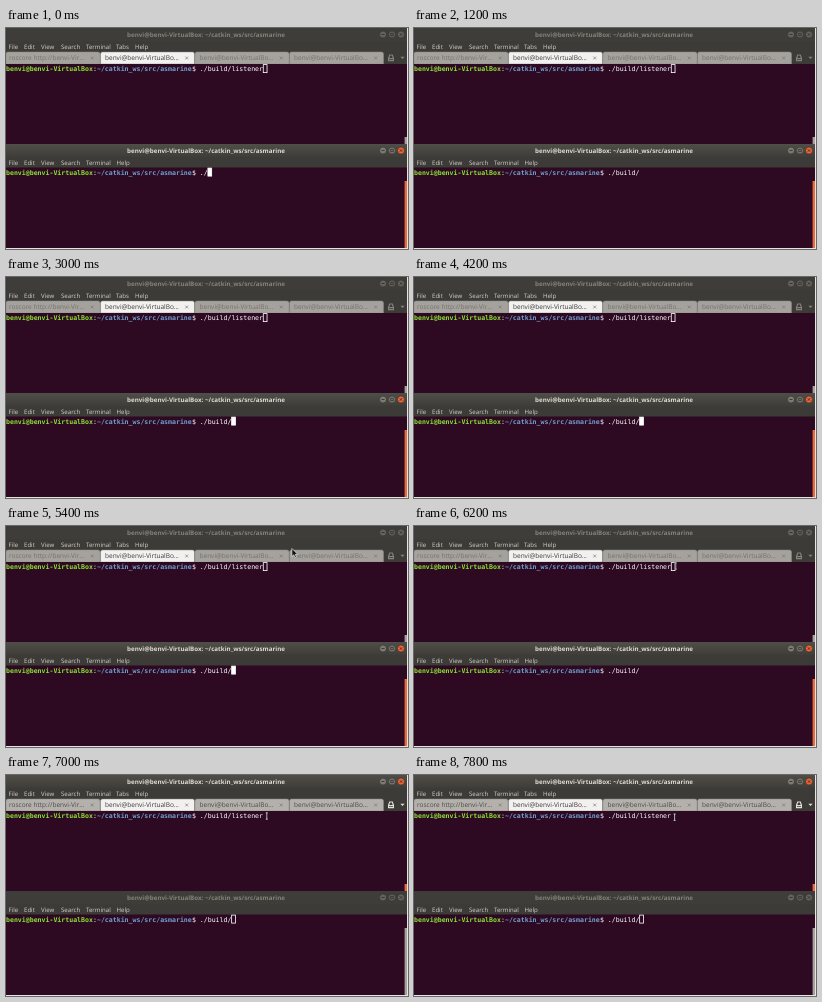
An HTML page that plays this animation: 402 px wide and 221 px high, repeating every 8 s.

```html
<!DOCTYPE html>
<html lang="en">
<head>
<meta charset="utf-8">
<title>Two terminals</title>
<style>
html, body { margin: 0; width: 100%; height: 100%; overflow: hidden; background: #e6e3e0; }
svg { display: block; width: 402px; height: 221px; }
text { font-family: "Open Sans", "Noto Sans", sans-serif; font-size: 6.1px; text-rendering: geometricPrecision; white-space: pre; }
.mono text { font-family: "DejaVu Sans Mono", monospace; font-size: 6.57px; fill: #fff; }
.mono .user { fill: #8ae234; font-weight: 700; }
.mono .path { fill: #729fcf; font-weight: 700; }
.bar { fill: #3e3d39; }
.active .bar { fill: url(#bar); }
.title { font-size: 6.22px; font-weight: 700; fill: #85827a; text-anchor: middle; }
.active .title { fill: #dfdbd2; }
.menu { fill: #d5d1c8; }
.tab { fill: #a5a29d; stroke: #8b8883; stroke-width: .5; }
.active .tab { fill: #b4b1ac; }
.tab.front, .active .tab.front { fill: #f3f1ef; }
.label { font-size: 6.5px; fill: #74716d; }
.active .label { fill: #4e4c49; }
.label.front, .active .label.front { fill: #3c3b39; }
.cross { stroke: #77746f; stroke-width: .7; }
.icon { fill: #85827a; }
.active .icon { fill: #e6e2da; }
.button { fill: #64625c; stroke: #33322e; stroke-width: .6; }
.active .button { fill: #7d7a72; }
.active .button.close { fill: #ee6437; }
.glyph { fill: none; stroke: #2e2d29; stroke-width: .8; }
.thumb { fill: #a5a19c; }
.active .thumb { fill: #ea6a3c; }
.caret { fill: none; stroke: #fff; stroke-width: .8; }
.active .caret { fill: #fff; }
</style>
</head>
<body>
<svg id="stage" viewBox="0 0 402 221" xmlns="http://www.w3.org/2000/svg">
  <defs>
    <linearGradient id="bar" x2="0" y2="1">
      <stop offset="0" stop-color="#504e48"/>
      <stop offset="1" stop-color="#3e3d39"/>
    </linearGradient>
  </defs>
</svg>
<script>
const COL = 3.955, LOOP = 8000, BLINK = 600, SWAP = 6400;
const USER = "benvi", HOST = USER + "@" + USER + "-VirtualBox", DIR = "~/catkin_ws/src/asmarine";
const PROMPT = HOST.length + DIR.length + 3;
const stage = document.getElementById("stage");

function add(parent, tag, attrs, text) {
  const el = document.createElementNS("http://www.w3.org/2000/svg", tag);
  for (const key in attrs) el.setAttribute(key, attrs[key]);
  if (text) el.textContent = text;
  parent.appendChild(el);
  return el;
}
const rect = (g, x, y, width, height, more) => add(g, "rect", { x, y, width, height, ...more });
const path = (g, d, more) => add(g, "path", { d, ...more });
const label = (g, x, y, text, cls) => add(g, "text", { x, y, class: cls }, text);

function addButtons(g, y) {
  const marks = ["M-1.5 0h3", "M-1.3 -1.2h2.6v2.4h-2.6z", "M-1.2 -1.2l2.4 2.4M1.2 -1.2l-2.4 2.4"];
  marks.forEach((d, i) => {
    const b = add(g, "g", { transform: `translate(${377 + i * 9} ${y})` });
    add(b, "circle", { r: 3.5, class: i === 2 ? "button close" : "button" });
    path(b, d, { class: "glyph" });
  });
}

function addTabs(g) {
  rect(g, 0, 24, 401, 12, { fill: "#3c3b37" });
  const shell = HOST.slice(0, -1) + "…";
  const names = [`roscore http://${USER}-Vir…`, shell, shell, shell];
  names.forEach((name, i) => {
    const x = i * 94.5, front = i === 1 ? " front" : "";
    path(g, `M${x} 36V26q0 -2 2 -2h90q2 0 2 2V36z`, { class: "tab" + front });
    label(g, x + (i ? 4.5 : 3), 32.4, name, "label" + front);
    path(g, `M${x + 84.8} 28.6l2.8 2.8m0 -2.8l-2.8 2.8`, { class: "cross" });
  });
  path(g, "M382 33.2v-3.2l1.3 -3.4h3.4l1.3 3.4v3.2zM383.3 30h3.4l-.8 -2.4h-1.8zM383 31.3v.8h4v-.8z",
    { class: "icon", "fill-rule": "evenodd" });
  path(g, "M394.4 28.7h4.2l-2.1 2.3z", { class: "icon" });
}

function addWindow(top, head, bottom, menus, tabbed) {
  const g = add(stage, "g", {});
  rect(g, 0, top, 401, 13, { class: "bar" });
  rect(g, 0, top + 13, 401, 11, { fill: "#3c3b37" });
  label(g, 200, top + 8.8, `${HOST}: ${DIR}`, "title");
  addButtons(g, top + 6.5);
  for (const [x, name] of menus) label(g, x, top + 20.7, name, "menu");
  if (tabbed) addTabs(g);
  rect(g, 0, head, 401, bottom - head, { fill: "#2d0922" });
  const thumbTop = tabbed ? 109 : 153;
  rect(g, 398.6, thumbTop, 2.4, bottom - thumbTop, { class: "thumb" });

  const mono = add(g, "g", { class: "mono" });
  const at = (col, text, cls) => label(mono, col * COL, head + 7.1, text, cls);
  at(0, HOST, "user");
  at(HOST.length, ":");
  at(HOST.length + 1, DIR, "path");
  at(PROMPT - 2, "$");
  const typed = at(PROMPT, "");
  const caret = rect(mono, 0, head + .6, COL - .2, 8, { class: "caret" });
  return {
    show(text, active, lit) {
      g.setAttribute("class", active ? "active" : "");
      typed.textContent = text;
      caret.setAttribute("x", (PROMPT + text.length) * COL + .2);
      caret.setAttribute("visibility", lit || !active ? "visible" : "hidden");
    }
  };
}

const menu = [[2.5, "File"], [18, "Edit"], [35, "View"], [55, "Search"], [80, "Terminal"]];
const upper = addWindow(0, 36, 116, [...menu, [110, "Tabs"], [129, "Help"]], true);
const lower = addWindow(116, 139.5, 220, [...menu, [110.5, "Help"]], false);

const arrow = path(stage, "M0 0V8L1.9 6.3L3.2 9.2L4.5 8.6L3.3 5.8H5.8Z",
  { fill: "#111", stroke: "#fff", "stroke-width": .6 });
const beam = add(stage, "g", {});
for (const [stroke, width] of [["#111", 1.4], ["#fff", .7]])
  path(beam, "M-1 .8H1M0 .8V7.2M-1 7.2H1", { fill: "none", stroke, "stroke-width": width });

// [start, value...] rows: the last row already reached applies
const typing = [[0, "./"], [400, "./b"], [600, "./build/"]];
const pointer = [
  [0, null], [5000, arrow, 166, 146.5], [5200, arrow, 177, 85.5], [5400, arrow, 285.9, 22.5],
  [5600, arrow, 280.3, 31], [5800, arrow, 268.5, 33.5], [6000, beam, 262.2, 35.8],
  [6200, beam, 261.8, 36], [6400, beam, 261, 36.2], [6600, beam, 260.8, 36],
  [7000, beam, 260.8, 37], [7200, beam, 261.2, 44.6], [7800, beam, 260.6, 38.2]
];
const reached = (rows, t) => rows.filter(r => r[0] <= t).pop();

// the blink restarts on typing and when the focus moves
function isLit(t) {
  if (t >= SWAP) return t < SWAP + BLINK;
  if (t < BLINK) return t < 200 || t >= 400;
  return Math.floor(t / BLINK) % 2 === 1;
}

function draw(t) {
  const swapped = t >= SWAP, lit = isLit(t);
  upper.show("./build/listener", swapped, lit);
  lower.show(reached(typing, t)[1], !swapped, lit);
  const [, shape, x, y] = reached(pointer, t);
  for (const p of [arrow, beam]) p.setAttribute("visibility", p === shape ? "visible" : "hidden");
  if (shape) shape.setAttribute("transform", `translate(${x} ${y})`);
}

const start = performance.now();
function tick() {
  draw((performance.now() - start) % LOOP);
  requestAnimationFrame(tick);
}
tick();
</script>
</body>
</html>
```
